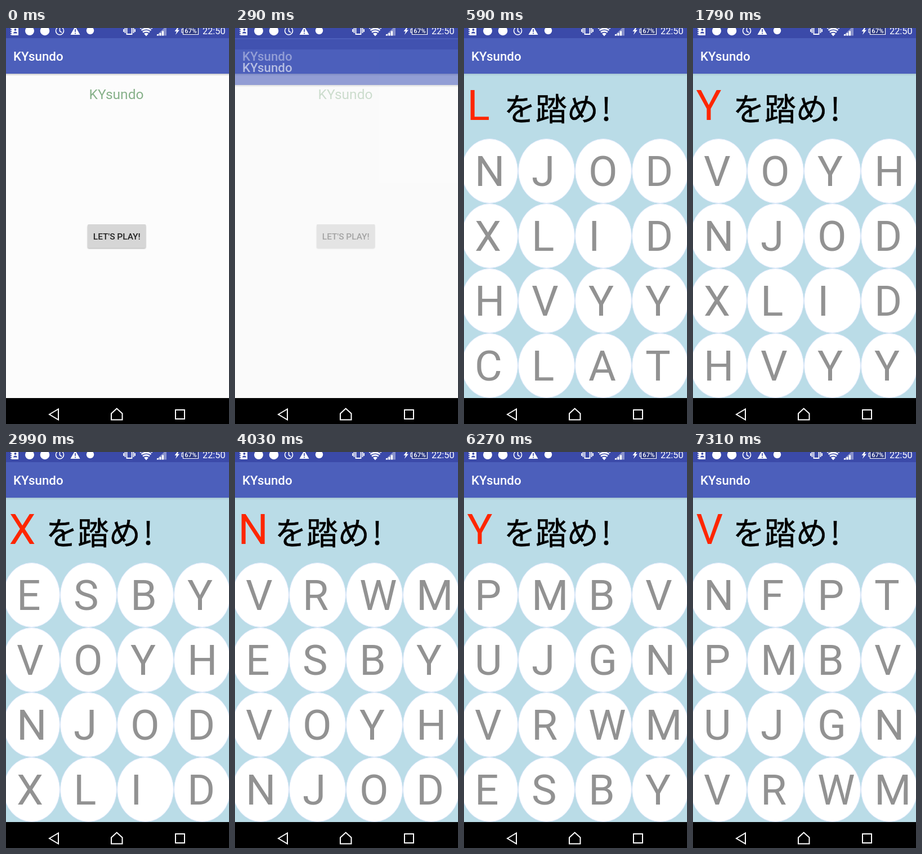
Write an HTML page that moves like this. It is 396 by 702 pixels and loops after 8 s.

```html
<!DOCTYPE html>
<html lang="ja">
<head>
<meta charset="utf-8">
<title>KYsundo</title>
<style>
  html, body { margin: 0; width: 100%; height: 100%; overflow: hidden; background: #000; }
  svg { display: block; width: 396px; height: 702px; font-family: Roboto, sans-serif; }
  .title { font-size: 22.3px; font-weight: 500; fill: #fff; }
  .letters { font-size: 75px; fill: #929292; }
  .head { font-size: 75px; fill: #ff2600; }
  .ask { font: 56px "Noto Sans CJK JP", "Noto Sans CJK", sans-serif; stroke: #000; stroke-width: .5px; }

  .press, .enter, .game, .shift { animation: 8s step-end infinite; }
  .press { animation-name: press; }
  .enter { animation-name: enter; }
  .game { animation-name: game; }
  .shift { animation-name: shift; }

  @keyframes press { 0% { opacity: 0 } 1.75%, 100% { opacity: 1 } }
  @keyframes enter {
    0% { opacity: 0; transform: translateY(20px) }
    3.625% { opacity: .6; transform: translateY(20px) }
    5.5%, 100% { opacity: 1; transform: none }
  }
  @keyframes game { 0% { visibility: hidden } 7.375%, 100% { visibility: visible } }
  /* every correct step moves the board down by one row */
  @keyframes shift {
    0% { transform: translateY(0) }
    22.375% { transform: translateY(115px) }
    35.5% { transform: translateY(230px) }
    44.875% { transform: translateY(345px) }
    57.875% { transform: translateY(460px) }
    76.5% { transform: translateY(575px) }
    91.375%, 100% { transform: translateY(690px) }
  }
</style>
</head>
<body>
<svg viewBox="0 0 396 702">
  <defs>
    <linearGradient id="shade" x2="0" y2="1">
      <stop stop-color="#000" stop-opacity=".2"/>
      <stop offset="1" stop-color="#000" stop-opacity="0"/>
    </linearGradient>
    <filter id="soft" x="-10%" y="-20%" width="120%" height="150%"><feGaussianBlur stdDeviation="1.3"/></filter>
    <clipPath id="boardClip"><rect y="196" width="396" height="460"/></clipPath>
    <clipPath id="headClip"><rect y="90" width="72" height="95"/></clipPath>
    <g id="bar">
      <rect width="396" height="81" fill="#4c5fbb"/>
      <rect width="396" height="18" fill="#3b4aa9"/>
      <text class="title" x="13" y="58">KYsundo</text>
      <rect y="81" width="396" height="4" fill="url(#shade)"/>
    </g>
  </defs>

  <g>
    <rect width="396" height="702" fill="#fcfcfc"/>
    <use href="#bar"/>
    <text x="196" y="125.5" font-size="24.5" fill="#87b18a" text-anchor="middle">KYsundo</text>
    <rect x="145" y="350" width="103" height="41" rx="2" fill="#000" opacity=".32" filter="url(#soft)"/>
    <rect x="145" y="348" width="103.500" height="42" rx="2" fill="#d6d6d6"/>
    <rect class="press" x="145" y="348" width="103.500" height="42" rx="2" fill="#c3c3c3"/>
    <text x="196.700" y="374.500" font-size="15.500" font-weight="500" fill="#202020" text-anchor="middle">LET'S PLAY!</text>
  </g>

  <g class="enter">
    <rect width="396" height="702" fill="#fafafa"/>
    <use href="#bar"/>
  </g>

  <g class="game">
    <rect y="81" width="396" height="575" fill="#badce7"/>
    <rect y="81" width="396" height="4" fill="url(#shade)" opacity=".5"/>
    <g clip-path="url(#headClip)"><g id="head" class="head shift"></g></g>
    <text class="ask" x="71" y="164">を踏め<tspan x="243.500">!</tspan></text>
    <g id="discs" fill="#fff" stroke="#dbe6fa"></g>
    <g clip-path="url(#boardClip)"><g id="letters" class="letters shift"></g></g>
  </g>

  <g fill="#fff">
    <path d="M10 -2H22V13H10Z"/>
    <path d="M8 1h3M8 4.500h3M8 8h3M8 11.500h3" stroke="#fff" stroke-width="1.500"/>
    <path d="M13 9.500c0-4 7-4 7 0zM14.500 3a2 2 0 1 0 4 0a2 2 0 1 0-4 0" fill="#3b4aa9"/>
    <circle cx="42" cy="5" r="8"/>
    <circle cx="69" cy="5" r="8.300"/>
    <g fill="none" stroke="#fff" stroke-width="1.600">
      <circle cx="95.500" cy="5" r="7"/>
      <path d="M95.500 0V5.500L99 8"/>
    </g>
    <path d="M123 -3L131.500 12H114.500Z"/>
    <path d="M123 2V7M123 8.500V10.500" stroke="#3b4aa9" stroke-width="1.700"/>
    <circle cx="149.500" cy="4.500" r="6.700"/>
    <path d="M214.500 -4V11H223.500V-4M211.500 0V9M226.500 0V9M209 2V7M229 2V7" fill="none" stroke="#fff" stroke-width="1.800"/>
    <path d="M249 14.500L245 10Q249 7 253 10Z"/>
    <path d="M243 7.500Q249 3.300 255 7.500M240.500 4Q249 -2 257.500 4M238 .5Q249 -6 260 .5" fill="none" stroke="#fff" stroke-width="2.700"/>
    <path d="M267 13.500L285 -4V13.500Z" opacity=".4"/>
    <path d="M268 11h3v2.500h-3zM272.500 9h3v4.500h-3zM277 5.500h3v8h-3z"/>
    <path d="M305.500 -2L299.500 6H303L301 12L308 3.500H304.500L307 -2Z"/>
    <path d="M314.500 -3V11.500H341.500V-3M314 2H312V8H314" fill="#2c3880" stroke="#fff" stroke-width="1.200"/>
    <text x="328" y="8.500" font-size="11.500" font-weight="500" text-anchor="middle">67%</text>
    <text x="349" y="10.500" font-size="16.300">22:50</text>
  </g>

  <rect y="656" width="396" height="46"/>
  <g fill="none" stroke="#fff" stroke-width="2">
    <path d="M77 685L93 675.500V694.500Z"/>
    <path d="M187 694.500V683.500L196.700 674.500L206.500 683.500V694.500Z"/>
    <path d="M301 677H317V693H301Z"/>
  </g>
</svg>
<script>
  const ROW = 115, COL = 101;
  // bottom row first; later rows wait above the visible board
  const rows = "CLAT HVYY XLID NJOD VOYH ESBY VRWM UJGN PMBV NFPT".split(" ");
  const targets = "LYXNVYV";

  const add = (parent, tag, attrs, text = "") => {
    const el = document.createElementNS("http://www.w3.org/2000/svg", tag);
    for (const key in attrs) el.setAttribute(key, attrs[key]);
    el.textContent = text;
    document.getElementById(parent).append(el);
  };

  for (let i = 0; i < 16; i++) {
    add("discs", "ellipse", {
      cx: 45.5 + (i % 4) * COL, cy: 253.5 + (i >> 2) * ROW, rx: 50, ry: 57
    });
  }
  rows.forEach((row, r) => [...row].forEach((ch, c) =>
    add("letters", "text", { x: 19 + c * COL, y: 625 - r * ROW }, ch)));
  [...targets].forEach((ch, i) =>
    add("head", "text", { x: 5.6, y: 163 - i * ROW }, ch));
</script>
</body>
</html>
```
